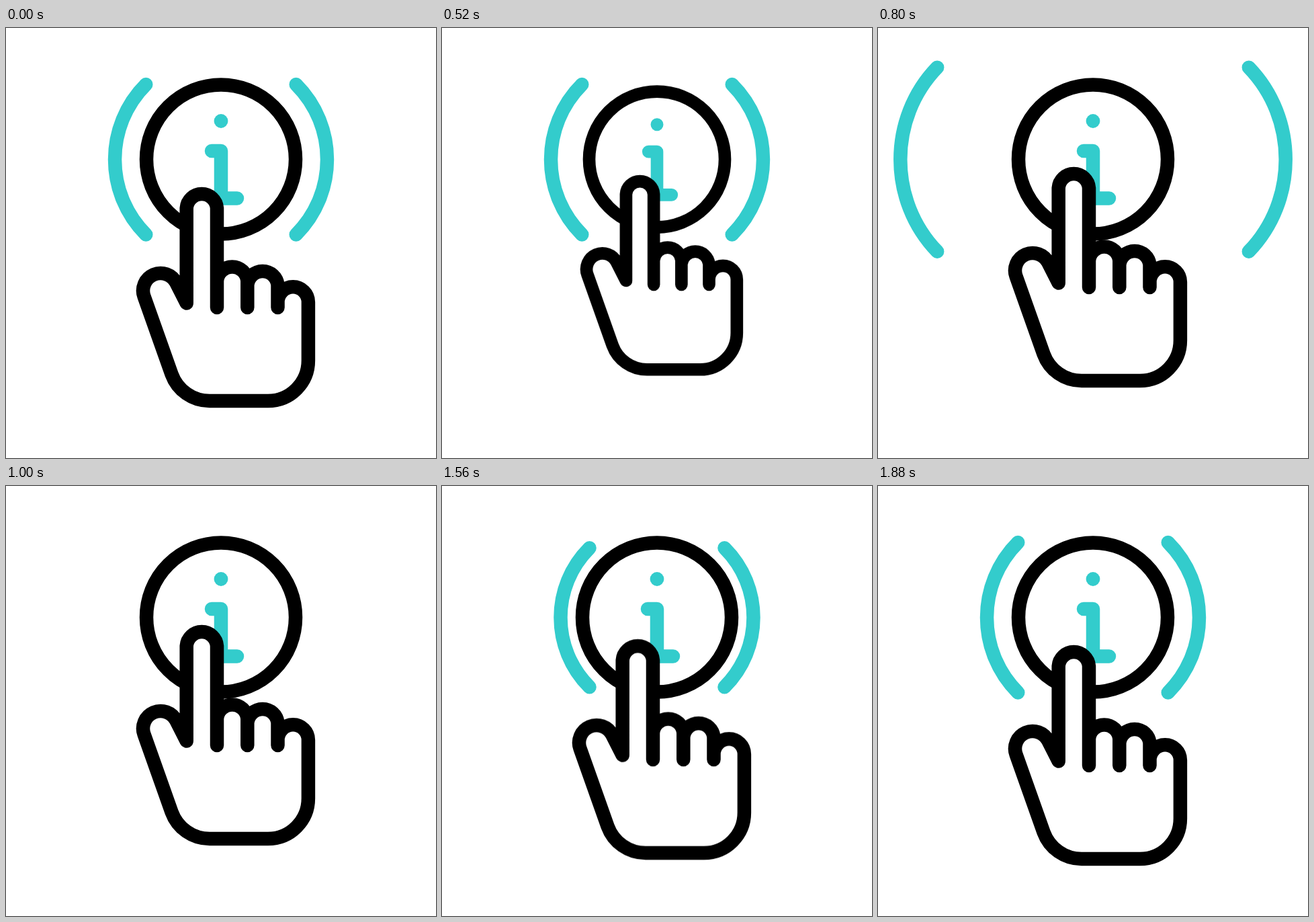
Write an HTML page that moves like this. It is 640x640 px and loops after 2000 ms.

```html
<!DOCTYPE html>
<html lang="en">
<head>
<meta charset="utf-8">
<title>Tap for information</title>
<style>
  :root {
    --teal: #33cccc;
    --smooth: cubic-bezier(.3333, 0, .6667, 1);
    --loop: 2s infinite both;
  }
  html, body { margin: 0; width: 100%; height: 100%; overflow: hidden; background: #fff; }
  svg { display: block; width: 100vw; height: 100vh; }
  path, circle {
    fill: none;
    stroke-width: 20.5;
    stroke-linecap: round;
    stroke-linejoin: round;
  }
  .teal { stroke: var(--teal); }
  .dot { fill: var(--teal); stroke: none; }
  .solid { fill: #fff; stroke: #000; }

  .launch { animation: launch var(--loop) var(--smooth); }
  .emerge { animation: emerge var(--loop) var(--smooth), reveal var(--loop) step-end; }
  .lift { animation: lift var(--loop) var(--smooth); }
  .press { animation: press var(--loop) var(--smooth); }
  .badge { transform-origin: 320px 195.5px; }
  .hand { transform-origin: 327px 370px; }

  /* Waves fly off the stage after the press */
  @keyframes launch {
    0%, 26% { d: path("M-111.7 -111.7C-173.4 -50 -173.4 50 -111.7 111.7"); }
    55%, 100% { d: path("M-363.7 -164.8C-449.4 -73.8 -449.4 73.8 -363.7 164.8"); }
  }
  /* New waves grow from behind the ring */
  @keyframes emerge {
    0%, 51.5% { d: path("M-73.7 -84C-120.8 -37.6 -120.8 37.6 -73.7 84"); }
    93%, 100% { d: path("M-111.7 -111.7C-173.4 -50 -173.4 50 -111.7 111.7"); }
  }
  @keyframes reveal {
    0% { visibility: hidden; }
    51.5%, 100% { visibility: visible; }
  }
  @keyframes lift {
    0%, 93%, 100% { transform: translateY(0); }
    16.75%, 51.5% { transform: translateY(-30px); }
  }
  @keyframes press {
    0%, 19.5%, 34.5%, 100% { transform: scale(1); }
    26% { transform: scale(.91); }
  }
</style>
</head>
<body>
<svg viewBox="0 0 640 640">
  <g class="teal" transform="translate(320 195.7)">
    <path class="launch" d="M-111.7 -111.7C-173.4 -50 -173.4 50 -111.7 111.7"/>
    <path class="emerge" d="M-73.7 -84C-120.8 -37.6 -120.8 37.6 -73.7 84"/>
  </g>
  <g class="teal" transform="translate(320 195.7) scale(-1 1)">
    <path class="launch" d="M-111.7 -111.7C-173.4 -50 -173.4 50 -111.7 111.7"/>
    <path class="emerge" d="M-73.7 -84C-120.8 -37.6 -120.8 37.6 -73.7 84"/>
  </g>

  <g class="badge press">
    <circle class="solid" cx="320" cy="195.5" r="111"/>
    <circle class="dot" cx="320" cy="138.5" r="10.4"/>
    <path class="teal" d="M306 183H320V253.5M296 253.5H344"/>
  </g>

  <g class="lift">
    <g class="hand press">
      <path class="solid" d="M268.7 409.5V268.3A22.7 22.7 0 0 1 314 268.3V416
        V376.6A22.7 22.7 0 0 1 359.3 376.6V416
        V382.6A22.7 22.7 0 0 1 404.5 382.6V416
        V408A22.7 22.7 0 0 1 449.9 408V495
        A60 60 0 0 1 389.9 555H303
        A60 60 0 0 1 246.6 515.5L205.6 399.9
        A26 26 0 0 1 253.2 379.2Z"/>
    </g>
  </g>
</svg>
</body>
</html>
```
